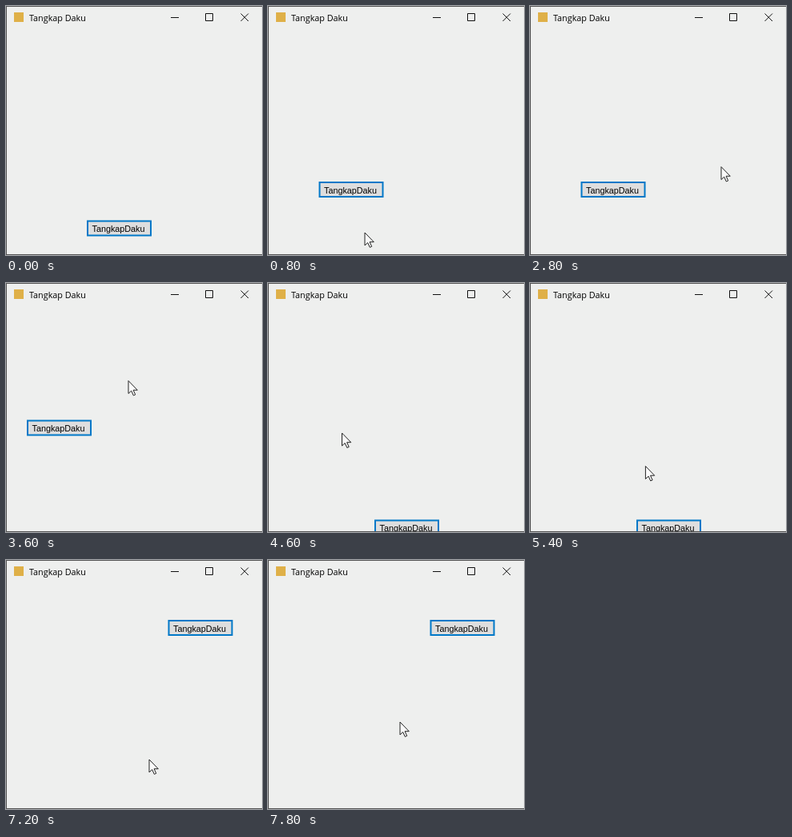
An HTML page for the animation above (8000 ms loop, 320x312 px).

```html
<!DOCTYPE html>
<html lang="ms">
<head>
<meta charset="utf-8">
<title>Tangkap Daku</title>
<style>
  html, body { margin: 0; width: 100%; height: 100%; overflow: hidden; background: #eeefee; }
  svg { display: block; width: 320px; height: 312px; }
  text { fill: #000; }
  .title { font: 10.8px "Open Sans", "Noto Sans", sans-serif; }
  .label { font: 10.8px "Liberation Sans", Arial, sans-serif; }
  .line { fill: none; stroke: #111; }
  .face { fill: #dedede; stroke: #0078c8; stroke-width: 2; }
  .hover .face { fill: #e5f1fb; stroke-width: 1.2; }
</style>
</head>
<body>
<svg viewBox="0 0 320 312">
  <rect x="10" y="8" width="12" height="12" fill="#dfb048"/>
  <text class="title" x="29" y="19">Tangkap Daku</text>
  <path class="line" d="M206 14.5h10M249.5 9.5h9v9h-9zM293.5 9.5l9.5 9.5M303 9.5l-9.5 9.5"/>
  <g id="button">
    <rect class="face" x="1" y=".5" width="79" height="18"/>
    <text class="label" x="6.5" y="14">TangkapDaku</text>
  </g>
  <path id="cursor" d="M0 0V16L3.7 12.6L6.3 18.4L8.7 17.4L6.1 11.7H11.3Z" fill="#fafafa" stroke="#222" stroke-linejoin="round"/>
  <path class="line" d="M0 .5H320M.5 0V312M0 311.5H320" style="stroke: #555"/>
</svg>
<script>
  const LOOP = 8000, STEP = 200, STEPS = 6;
  const button = document.getElementById("button");
  const cursor = document.getElementById("cursor");

  const home = { x: 101, y: 269 };
  const outside = { x: 340, y: 190 };
  const dodge = { x: -37.5, y: -48.5 };

  // Each trip reaches `hit` at step `at`, then drifts to `rest`; the button flees by `jump`.
  const trips = [
    { start: 400, at: 2, hit: { x: 121, y: 284 }, jump: dodge },
    { start: 1600, at: 3, hit: outside },
    { start: 2600, at: 4, hit: { x: 138, y: 236 }, rest: { x: 153, y: 122.5 }, jump: dodge },
    { start: 3800, at: 4, hit: { x: 91, y: 187 }, rest: { x: 94, y: 191 }, jump: { x: 107, y: 125 } },
    { start: 5000, at: 5, hit: { x: 178, y: 298 }, rest: { x: 179, y: 280 }, jump: { x: 107, y: -173 } },
    { start: 6200, at: 2, hit: { x: 250.5, y: 136 }, rest: { x: 179, y: 250 }, jump: dodge },
    { start: 7400, at: 3, hit: { x: 165, y: 203 } }
  ];

  const add = (a, b) => ({ x: a.x + b.x, y: a.y + b.y });
  const place = (node, p) => node.setAttribute("transform", `translate(${p.x} ${p.y})`);

  // Sideways at an even pace, vertically gathering speed.
  const sweep = (a, b, p) => ({ x: a.x + (b.x - a.x) * p, y: a.y + (b.y - a.y) * p * p });

  function stateAt(t) {
    let box = home, tip = outside, hover = false;
    for (const { start, at, hit, rest = hit, jump } of trips) {
      if (t < start) break;
      const step = Math.min(STEPS, Math.floor((t - start) / STEP) + 1);
      const caught = step > at;
      tip = caught ? sweep(hit, rest, (step - at) / (STEPS - at)) : sweep(tip, hit, step / at);
      hover = Boolean(jump) && step === at;
      if (jump && caught) box = add(box, jump);
    }
    return { box, tip, hover };
  }

  const start = performance.now();
  function tick() {
    const { box, tip, hover } = stateAt((performance.now() - start) % LOOP);
    place(button, box);
    place(cursor, tip);
    button.classList.toggle("hover", hover);
    requestAnimationFrame(tick);
  }
  tick();
</script>
</body>
</html>
```
